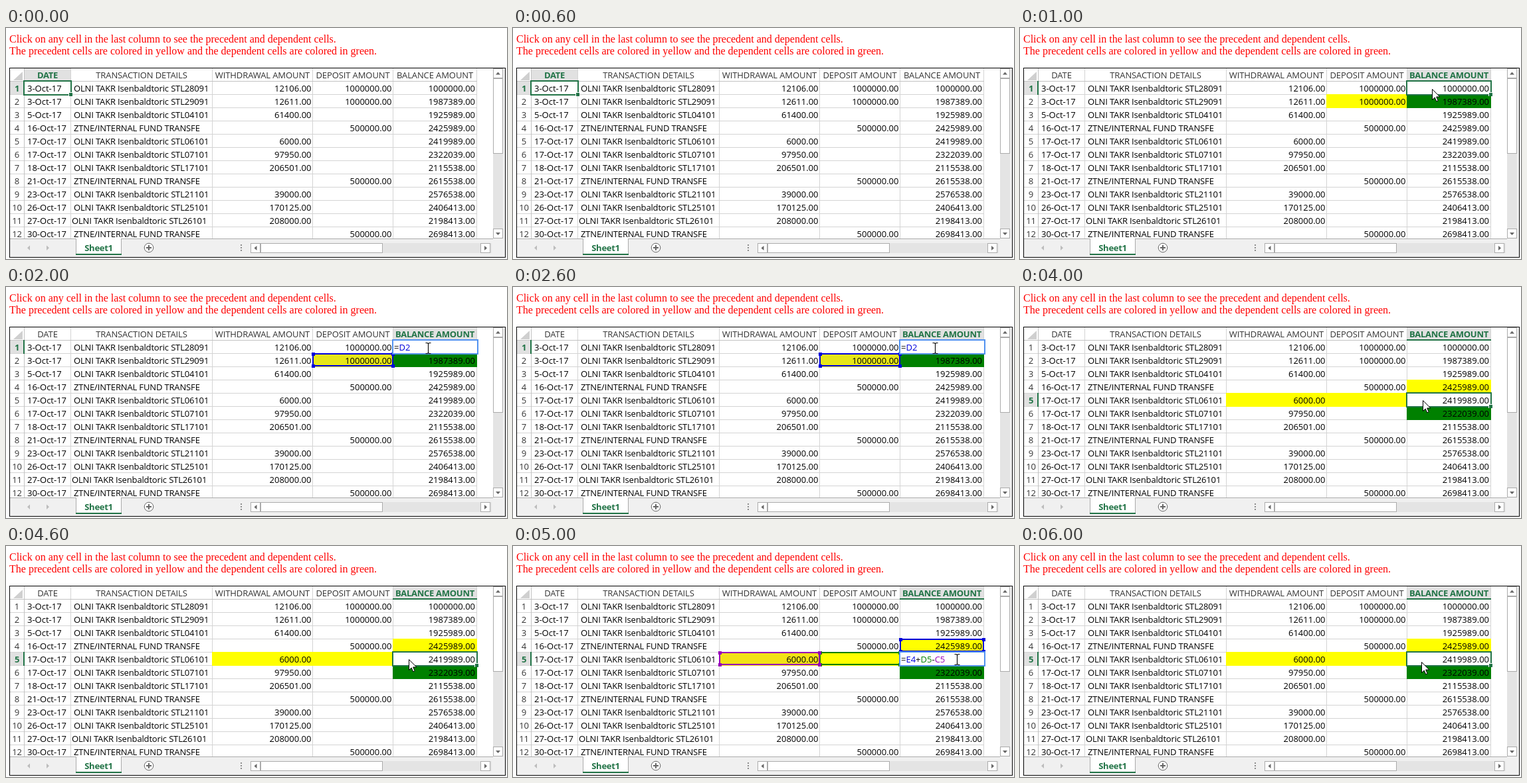
Recreate the animation shown at these times as an HTML page. Size 754x349 px, loop 7 s.

```html
<!DOCTYPE html>
<html lang="en">
<head>
<meta charset="utf-8">
<title>Precedent and dependent cells</title>
<style>
html, body { margin: 0; width: 100%; height: 100%; overflow: hidden; background: #fff; }
svg { display: block; width: 754px; height: 349px; }
text { font: 13px "Open Sans", "Noto Sans", sans-serif; white-space: pre; }
.intro { font: 16px "Liberation Serif", "Times New Roman", serif; fill: #f00; }
.head { fill: #333; letter-spacing: -.1px; }
.on { fill: #217346; font-weight: 700; letter-spacing: -.27px; }
.detail { letter-spacing: -.15px; }
rect { shape-rendering: crispEdges; }
</style>
</head>
<body>
<svg id="stage" viewBox="0 0 754 349" xmlns="http://www.w3.org/2000/svg">
  <defs><clipPath id="view"><rect x="6" y="61" width="727" height="257"/></clipPath></defs>
  <g id="base"></g>
  <g clip-path="url(#view)">
    <g id="grid"></g><g id="fills"></g><g id="labels"></g><g id="marks"></g>
  </g>
  <g id="chrome"></g>
  <g id="pointer"></g>
</svg>
<script>
const $ = id => document.getElementById(id);
const GREEN = '#217346', YELLOW = '#ffff00', BLUE = '#0000dc', PURPLE = '#9800b8';
const TOP = 81, ROW = 20, STEP = 1000;

// Gridline positions on both sides of each column
const cols = {
  A: { l: 27, r: 97, name: 'DATE' },
  B: { l: 97, r: 310, name: 'TRANSACTION DETAILS' },
  C: { l: 310, r: 461, name: 'WITHDRAWAL AMOUNT' },
  D: { l: 461, r: 582, name: 'DEPOSIT AMOUNT' },
  E: { l: 582, r: 708, name: 'BALANCE AMOUNT' }
};

const pay = 'OLNI TAKR Isenbaldtoric STL', move = 'ZTNE/INTERNAL FUND TRANSFE';
const rows = [
  ['3', pay + '28091', '12106', '1000000', '1000000'],
  ['3', pay + '29091', '12611', '1000000', '1987389'],
  ['5', pay + '04101', '61400', '', '1925989'],
  ['16', move, '', '500000', '2425989'],
  ['17', pay + '06101', '6000', '', '2419989'],
  ['17', pay + '07101', '97950', '', '2322039'],
  ['18', pay + '17101', '206501', '', '2115538'],
  ['21', move, '', '500000', '2615538'],
  ['23', pay + '21101', '39000', '', '2576538'],
  ['26', pay + '25101', '170125', '', '2406413'],
  ['27', pay + '26101', '208000', '', '2198413'],
  ['30', move, '', '500000', '2698413']
];

const first = { cell: 'E1', fills: { D2: YELLOW, E2: '#008000' } };
const second = { cell: 'E5', fills: { E4: YELLOW, C5: YELLOW, D5: YELLOW, E6: '#008000' } };
const states = [
  { cell: 'A1', fills: {} },
  { ...first, arrow: [620, 92] },
  { ...first, fills: { ...first.fills, D2: '#e6e619' }, beam: [635, 92],
    formula: [['=', '#000'], ['D2', BLUE]], refs: { D2: BLUE } },
  first,
  { ...second, arrow: [606, 171] },
  { ...second, fills: { ...second.fills, C5: '#f2e216' }, beam: [668, 171],
    formula: [['=', '#000'], ['E4', BLUE], ['+', '#000'], ['D5', '#008000'], ['-', '#000'], ['C5', PURPLE]],
    refs: { E4: BLUE, D5: '#008000', C5: PURPLE } },
  { ...second, arrow: [604, 175] }
];

const box = (x, y, w, h, fill, more = '') =>
  `<rect x="${x}" y="${y}" width="${w}" height="${h}" fill="${fill}" ${more}/>`;
const frame = (x, y, w, h, color, width = 1, fill = 'none') =>
  box(x, y, w, h, fill, `stroke="${color}" stroke-width="${width}"`);
const path = (d, fill, more = '') => `<path d="${d}" fill="${fill}" ${more}/>`;
const text = (x, y, s, cls = '', anchor = 'start') =>
  `<text x="${x}" y="${y}" class="${cls}" text-anchor="${anchor}">${s}</text>`;
const place = ref => {
  const n = +ref.slice(1);
  return { ...cols[ref[0]], n, y: TOP + (n - 1) * ROW };
};

function drawBase() {
  $('base').innerHTML =
    box(0, 0, 754, 349, '#fff') +
    text(5, 22, 'Click on any cell in the last column to see the precedent and dependent cells.', 'intro') +
    text(5, 40, 'The precedent cells are colored in yellow and the dependent cells are colored in green.', 'intro');

  let s = path('M25 66V79H11Z', '#cfcfcf');
  for (const k in cols) s += box(cols[k].r, 61, 1, 257, '#d4d4d4');
  for (let i = 1; i < rows.length; i++) s += box(6, TOP + i * ROW - 1, 703, 1, '#d4d4d4');
  s += box(6, 80, 703, 1, '#c2c2c2') + box(27, 61, 1, 257, '#c2c2c2');
  $('grid').innerHTML = s;
}

function scrollButton(x, y, arrow) {
  return frame(x + .5, y + .5, 14, 14, '#ababab', 1, '#fff') + path(arrow, '#666');
}

function drawChrome() {
  let s = box(6, 318, 745, 28, '#f0f0f0') + box(733, 61, 18, 257, '#f0f0f0') +
    box(6, 318, 727, 1, '#ababab');
  // Sheet tabs
  s += path('M36 328.5V336L32 332.2Z', '#bcbcbc') + path('M61 328.5V336L65 332.2Z', '#bcbcbc');
  s += box(105, 318, 69, 25, '#fff') + box(105, 318, 1, 25, '#ababab') +
    box(173, 318, 1, 25, '#ababab') + box(105, 341, 69, 2, GREEN) +
    text(139.5, 336.5, 'Sheet1', 'on', 'middle');
  s += '<circle cx="215" cy="332" r="6.8" fill="#fff" stroke="#666"/>' +
    box(211, 331, 8, 2, '#666') + box(214, 328, 2, 8, '#666');
  for (const y of [327, 331, 335]) s += box(353, y, 2, 2, '#8c8c8c');
  // Scroll bars
  s += box(368, 325, 363, 15, '#e4e4e4') + frame(383.5, 325.5, 183, 14, '#ababab', 1, '#fff') +
    scrollButton(368, 325, 'M377.5 329V336L373.5 332.5Z') +
    scrollButton(714, 325, 'M720 329V336L724 332.5Z');
  s += box(733, 61, 15, 257, '#e4e4e4') + frame(733.5, 76.5, 14, 113, '#ababab', 1, '#fff') +
    scrollButton(733, 61, 'M737 70.5H744L740.5 66.5Z') +
    scrollButton(733, 303, 'M737 309H744L740.5 313Z');
  s += frame(5.5, 60.5, 746, 286, '#000');
  $('chrome').innerHTML = s;
}

function labels(sel) {
  let s = '';
  for (const k in cols) {
    const c = cols[k];
    s += text((c.l + c.r) / 2 + .5, 76, c.name, k === sel.col ? 'on' : 'head', 'middle');
  }
  rows.forEach(([day, detail, ...sums], i) => {
    const y = 96 + i * ROW;
    s += text(16.5, y, i + 1, i + 1 === sel.n ? 'on' : 'head', 'middle') +
      text(32, y, day + '-Oct-17') + text(i === 10 ? 99 : 102, y, detail, 'detail');
    sums.forEach((v, j) => {
      if (v) s += text([459.5, 580.5, 706][j], y, v + '.00', '', 'end');
    });
  });
  return s;
}

function selection({ l, r, y }) {
  return frame(l, y - 1, r + 1 - l, 21, GREEN, 2) +
    box(r - 3, y + 16, 6, 6, '#fff') + box(r - 2, y + 17, 5, 5, GREEN);
}

function reference(ref, color) {
  const { l, r, y } = place(ref), x = l + 1, w = r - l - 1;
  let s = frame(x, y, w, 18, color, 2);
  for (const cx of [x, x + w]) for (const cy of [y, y + 18]) s += box(cx - 2, cy - 2, 5, 5, color);
  return s;
}

function editor({ l, r, y }, formula) {
  const parts = formula.map(([s, c]) => `<tspan fill="${c}">${s}</tspan>`).join('');
  return frame(l, y - 1, r + 2 - l, 21, '#5292f0', 2, '#fff') + text(l + 2, y + 15, parts);
}

const arrow = ([x, y]) => `<g transform="translate(${x} ${y})">` +
  path('M.5 .5V16.5L4.2 13L6.7 18.8L9.2 17.8L6.7 12H11.8Z', '#fff', 'stroke="#000"') + '</g>';
const beam = ([x, y]) => path(
  `M${x - 3.5} ${y - 7.5}H${x - 1}L${x + .5} ${y - 6.5}L${x + 2} ${y - 7.5}H${x + 4.5}` +
  `M${x + .5} ${y - 6.5}V${y + 7.5}M${x - 3.5} ${y + 8.5}H${x - 1}L${x + .5} ${y + 7.5}L${x + 2} ${y + 8.5}H${x + 4.5}`,
  'none', 'stroke="#000" stroke-width="1.1"');

function draw(st) {
  const sel = { ...place(st.cell), col: st.cell[0] };
  let fills = box(sel.l + 1, 61, sel.r - sel.l - 1, 18, '#e1e1e1') +
    box(6, sel.y, 20, 19, '#e1e1e1') +
    box(sel.l, 79, sel.r - sel.l + 1, 2, GREEN) + box(26, sel.y - 1, 2, 21, GREEN);
  // Fills cover the gridlines on all four sides
  for (const ref in st.fills) {
    const c = place(ref);
    fills += box(c.l, c.y - 1, c.r - c.l + 1, ROW + 1, st.fills[ref]);
  }
  $('fills').innerHTML = fills;
  $('labels').innerHTML = labels(sel);

  let marks = '';
  for (const ref in st.refs || {}) marks += reference(ref, st.refs[ref]);
  marks += st.formula ? editor(sel, st.formula) : selection(sel);
  $('marks').innerHTML = marks;
  $('pointer').innerHTML = st.arrow ? arrow(st.arrow) : st.beam ? beam(st.beam) : '';
}

let shown = -1;
function tick() {
  const i = Math.floor(performance.now() / STEP) % states.length;
  if (i !== shown) draw(states[shown = i]);
  requestAnimationFrame(tick);
}

drawBase();
drawChrome();
tick();
</script>
</body>
</html>
```
